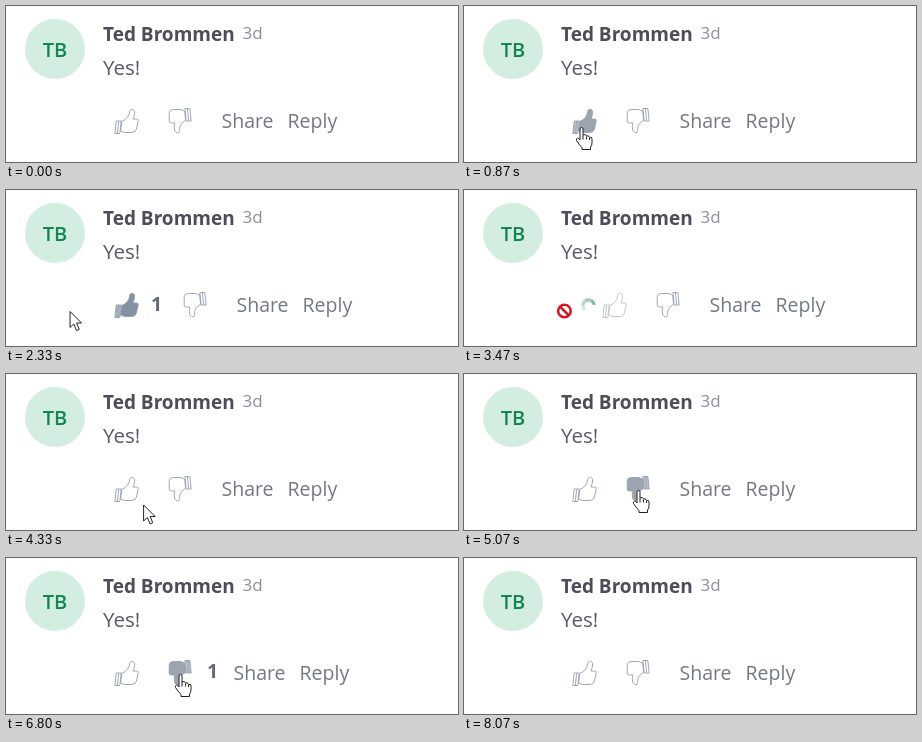
An HTML page for the animation above (9940 ms loop, 452 by 156 pixels).

```html
<!DOCTYPE html>
<html lang="en">
<head>
<meta charset="utf-8">
<title>Comment votes</title>
<style>
html, body { margin: 0; width: 100%; height: 100%; overflow: hidden; background: #fff; }
svg { display: block; width: 100%; height: 100%; }
text { font: 19.5px "Open Sans", "Noto Sans", sans-serif; fill: #737885; }
.bold { font-weight: 600; }
.count { font-weight: 700; fill: #646a79; }
.icon { stroke: #98a2b0; stroke-width: .9; stroke-linejoin: round; }
.spin { fill: none; stroke: #78b89f; stroke-width: 3.2; }
</style>
</head>
<body>
<svg viewBox="0 0 452 156">
  <defs>
    <g id="thumb">
      <path d="M6 13Q13 10 13 3C13 0 17 0 18 3Q18.500 7 17 10.500H20.500Q23 10.500 22.500 13L21.500 21Q21 24 17 24H10L6 22.500Z"/>
      <path d="M.5 12.500H5.500V25H.5ZM3 13V25" fill-opacity=".7"/>
    </g>
    <g id="ring">
      <path d="M-3.600 4.300A5.600 5.600 0 0 1 -5.600 0" opacity=".35"/>
      <path d="M-5.600 0A5.600 5.600 0 0 1 -2.800 -4.850" opacity=".55"/>
      <path d="M-2.800 -4.850A5.600 5.600 0 0 1 2.800 -4.850" opacity=".75"/>
      <path d="M2.800 -4.850A5.600 5.600 0 0 1 5.600 -.5" opacity=".95"/>
    </g>
  </defs>

  <circle cx="49" cy="43" r="30" fill="#d3eee0"/>
  <text class="bold" x="49" y="51" text-anchor="middle" style="fill:#138550;font-size:20px">TB</text>
  <text class="bold" x="97" y="35" style="fill:#4b4e59;font-size:19px;font-weight:700">Ted Brommen</text>
  <text x="236.500" y="33" style="fill:#8a8f99;font-size:17px">3d</text>
  <text x="97" y="68.500" style="fill:#555a65;font-size:20.500px">Yes!</text>

  <g id="up">
    <use class="spin" href="#ring"/>
    <g class="icon"><use href="#thumb" transform="translate(111 102.500) skewX(-6)"/></g>
    <text class="count" y="121">1</text>
  </g>
  <g id="down">
    <use class="spin" href="#ring"/>
    <g class="icon"><use href="#thumb" transform="translate(187 127.500) rotate(180) skewX(6)"/></g>
    <text class="count" y="120">1</text>
  </g>
  <g id="links">
    <text x="215.500" y="122">Share</text>
    <text x="281.500" y="122">Reply</text>
  </g>

  <g id="cursor">
    <path id="arrow" d="M.5 .5V16.500L4.300 13L7 19.500L9.700 18.300L7 12H12Z" fill="#fff" stroke="#222"/>
    <path id="hand" d="M-2 13V2Q-2 .5 -.5 .5Q1 .5 1 2V8Q4 6.500 4.500 9Q7 8 7.500 10.500Q10 9.500 10 12V16Q10 18.500 8.500 20V22.500H0V20.500Q-3 17.500 -5.500 13.500Q-6 11.500 -4.500 11Q-3.500 11 -2 13ZM1 8V12.500M4.500 9.500V12.500M7.500 11V13" fill="#fff" stroke="#222" stroke-linejoin="round"/>
    <g id="blocked" fill="none" stroke="#d31824" stroke-width="2.600">
      <circle r="8" fill="#fff" stroke="none"/>
      <circle r="6.300"/>
      <path d="M-4.400 -4.400L4.400 4.400"/>
    </g>
  </g>
</svg>

<script>
const LOOP = 9940, FRAMES_PER_MS = 0.015, SPINNER_WIDTH = 30;
const byId = id => document.getElementById(id);
const show = (el, on) => el.style.display = on ? "" : "none";
const move = (el, x, y = 0) => el.setAttribute("transform", `translate(${x} ${y})`);
const easeOut = k => 1 - (1 - k) ** 2;

const spots = {
  start: [108, 160], up: [118, 121], rest: [46, 121],
  right: [190, 136], down: [175, 116], below: [175, 160]
};
const glide = (at, length, to) => ({ at, length, to: spots[to] });
const glides = [
  glide(200, 470, "up"), glide(1400, 570, "rest"),
  glide(2270, 460, "up"), glide(3440, 230, "rest"),
  glide(4200, 330, "right"), glide(4600, 400, "down"),
  glide(5600, 330, "below"), glide(6530, 270, "down"),
  glide(7800, 270, "below")
];

function pointer(t) {
  let [x, y] = spots.start;
  for (const { at, length, to } of glides) {
    const k = easeOut(Math.max(0, Math.min(1, (t - at) / length)));
    x += (to[0] - x) * k;
    y += (to[1] - y) * k;
  }
  return [x, y];
}

// The first click gives a vote, the second takes it back; each one waits on a spinner.
const click = (at, wait) => ({ at, end: at + wait });
function button(id, left, countX, countWidth, ...clicks) {
  const root = byId(id), [spin, icon, count] = root.children;
  return { root, spin, icon, count, left, countX, countWidth, clicks };
}
const buttons = [
  button("up", 110, 145, 15, click(1070, 860), click(3270, 400)),
  button("down", 163, 201, 12, click(5270, 600), click(6930, 940))
];

function draw(now) {
  const step = Math.floor(now % LOOP * FRAMES_PER_MS + 0.06);
  const t = Math.round(step / FRAMES_PER_MS / 10) * 10;
  const [px, py] = pointer(t);
  let shift = 0, kind = "arrow";

  for (const b of buttons) {
    const waiting = b.clicks.find(c => t >= c.at && t < c.end);
    const voted = t >= b.clicks[0].at && t < b.clicks[1].at;
    const extra = waiting ? SPINNER_WIDTH : 0;
    const width = extra + (voted ? b.countWidth : 0);
    const x = px - b.left - shift;
    const over = x > -15 && x < 38 + width && py > 98 && py < 126;
    if (over) kind = waiting ? "blocked" : "hand";

    move(b.root, shift);
    move(b.icon, extra);
    move(b.count, b.countX + extra);
    show(b.count, voted);
    show(b.spin, waiting);
    if (waiting) {
      const angle = 196 + (t - waiting.at) / 440 * 360;
      b.spin.setAttribute("transform", `translate(${b.left + 14.5} 115.5) rotate(${angle})`);
    }
    b.icon.style.fill = over && !waiting ? "#9ca4b0" : voted ? "#8491a5" : "none";
    b.icon.style.opacity = waiting ? 0.65 : 1;
    shift += width;
  }

  move(byId("links"), shift);
  move(byId("cursor"), px, py);
  for (const id of ["arrow", "hand", "blocked"]) show(byId(id), id === kind);
  requestAnimationFrame(draw);
}
requestAnimationFrame(draw);
</script>
</body>
</html>
```
